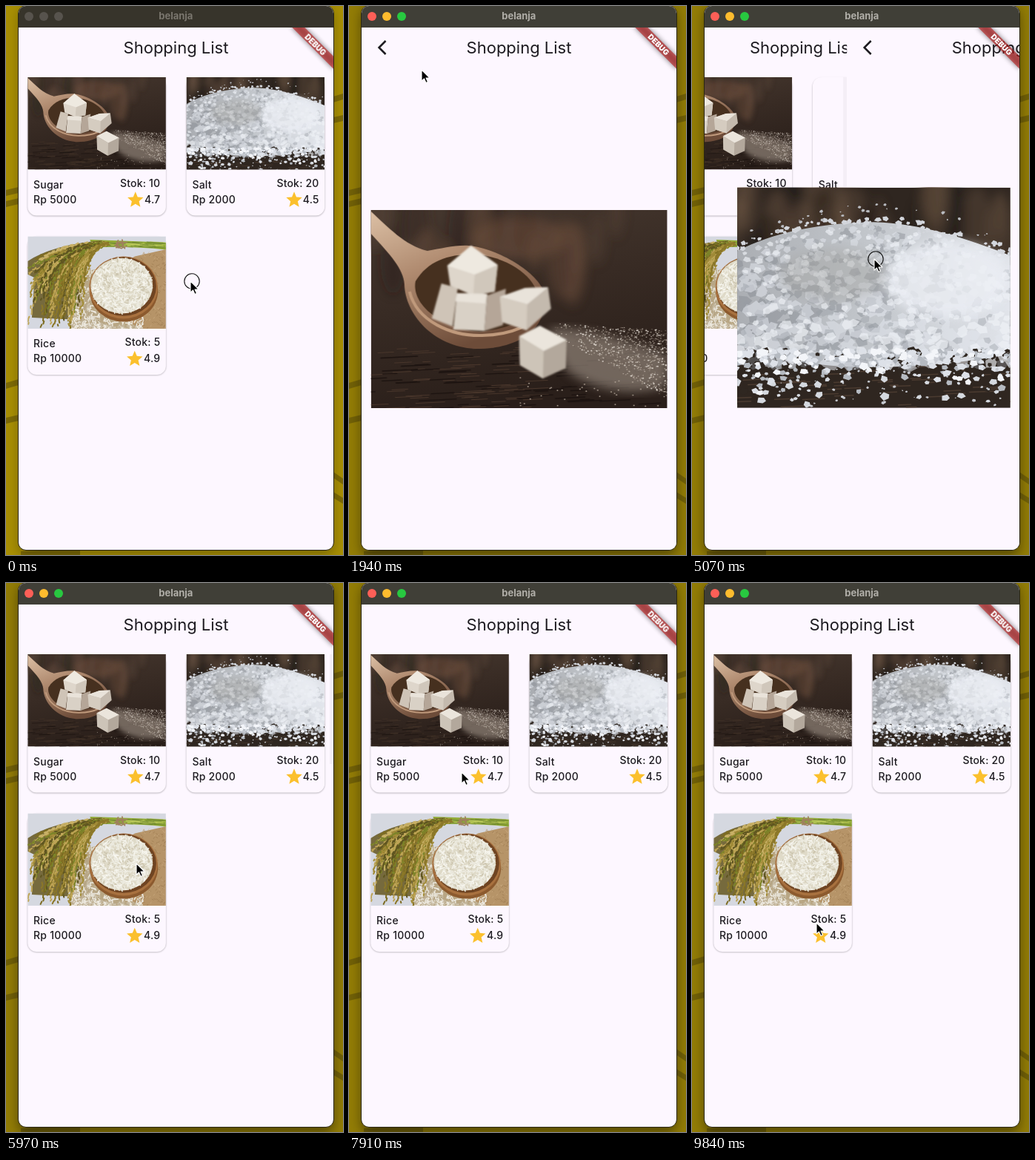
An HTML page for the animation above (9.86 s loop, 455x740 px).

```html
<!DOCTYPE html>
<html lang="en">
<head>
<meta charset="utf-8">
<title>Shopping List</title>
<style>
html, body { margin: 0; width: 100%; height: 100%; overflow: hidden; background: #927c06; }
svg { display: block; }
text { font-family: Inter, "Open Sans", sans-serif; fill: #1d1b20; }
.body { font-size: 14px; letter-spacing: .2px; font-weight: 450; }
.head { font-size: 22px; text-anchor: middle; }
.end { text-anchor: end; }
</style>
</head>
<body>
<svg id="stage" width="455" height="740" viewBox="0 0 455 740"></svg>
<script>
const LOOP = 9860;
const stage = document.getElementById('stage');

// ---------- seeded drawing helpers ----------
let seed = 7;
const rnd = (a = 0, b = 1) => {
  seed = (seed + 0x6D2B79F5) | 0;
  let h = Math.imul(seed ^ (seed >>> 15), 1 | seed);
  h = (h + Math.imul(h ^ (h >>> 7), 61 | h)) ^ h;
  return a + (b - a) * ((h ^ (h >>> 14)) >>> 0) / 4294967296;
};
const r1 = v => Math.round(v * 10) / 10;
const lerp = (a, b, t) => a + (b - a) * t;
const repeat = (n, fn) => Array.from({ length: n }, (_, i) => fn(i)).join('');
const poly = (pts, fill) => `<polygon points="${pts}" fill="${fill}"/>`;
const marks = (n, color, w, fn) =>
  `<path d="${repeat(n, fn)}" stroke="${color}" stroke-width="${w}" stroke-linecap="round" fill="none"/>`;
const grain = (x, y, len, ang) => {
  const dx = Math.cos(ang) * len, dy = Math.sin(ang) * len;
  return `M${r1(x - dx / 2)} ${r1(y - dy / 2)}l${r1(dx)} ${r1(dy)}`;
};
const inEllipse = (cx, cy, rx, ry) => {
  const a = rnd(0, 2 * Math.PI), k = Math.sqrt(rnd());
  return [cx + rx * k * Math.cos(a), cy + ry * k * Math.sin(a)];
};
const crystal = (x, y, size) => {
  const turn = rnd(0, 6);
  return repeat(5, i => {
    const a = turn + i * 1.257, s = size * rnd(.6, 1.1);
    return `${i ? 'L' : 'M'}${r1(x + s * Math.cos(a))} ${r1(y + s * .8 * Math.sin(a))}`;
  }) + 'Z';
};
const crystals = (n, color, fn) => `<path d="${repeat(n, fn)}" fill="${color}"/>`;
const streaks = (n, colors, h) => repeat(n, i =>
  `<ellipse cx="${r1(rnd(0, 400))}" cy="${r1(rnd(0, h))}" rx="${r1(rnd(8, 24))}" ry="${r1(rnd(20, 60))}" fill="${colors[i % colors.length]}" opacity=".4"/>`);

// ---------- pictures ----------
function sugarArt() {
  const pile = () => {
    const k = Math.sqrt(rnd()), x = 245 + 155 * k;
    return `M${r1(x)} ${r1(160 + 48 * k + rnd(-1, 1) * (8 + 38 * k))}h.1`;
  };
  return `<rect width="400" height="267" fill="url(#wood)"/>
    <g filter="url(#soft)">${streaks(18, ['#5a4436', '#2a201b', '#664b3b'], 75)}
    <ellipse cx="200" cy="38" rx="66" ry="28" fill="#694b3b" opacity=".6"/></g>
    ${marks(70, '#4b382d', 1, () => grain(rnd(0, 240), rnd(185, 267), rnd(10, 40), -.05))}
    ${marks(60, '#1d1411', 1.3, () => grain(rnd(0, 400), rnd(190, 267), rnd(10, 50), -.05))}
    <path d="M0 2C22 22 46 48 76 55C96 52 112 47 132 48C172 52 226 84 234 112C240 160 200 188 140 187C84 184 46 140 45 100C44 80 26 60 0 32Z" fill="url(#spoon)"/>
    <path d="M60 96C78 66 110 58 146 60C190 66 222 92 225 116C222 146 188 160 146 164C96 160 54 128 60 96Z" fill="#46301f"/>
    <path d="M52 110C62 150 108 170 150 169C190 168 218 156 229 134" fill="none" stroke="#c09a7c" stroke-width="4"/>
    <path d="M240 160C290 156 350 180 400 194L400 237C350 254 290 240 262 214Z" fill="#92857a" opacity=".7" filter="url(#soft)"/>
    ${marks(420, '#c9beb2', 1.4, pile)}${marks(380, '#6d6056', 1.5, pile)}${marks(110, '#f0eae2', 1.7, pile)}
    ${marks(40, '#b9ac9e', 1.7, () => `M${r1(rnd(200, 400))} ${r1(rnd(225, 266))}h.1`)}
    <g filter="url(#lift)">
    ${poly('157,115 182,106 178,155 153,163', '#b5a698')}
    ${poly('95,99 117,105 110,157 82,146', '#cfc4b7')}
    ${poly('135,48 171,74 167,110 138,115 107,102 103,75', '#ded6cb')}
    ${poly('135,48 171,74 140,87 103,75', '#eee9e0')}
    ${poly('140,87 171,74 167,110 138,115', '#d0c7bb')}
    ${poly('116,112 157,113 153,163 111,161', '#d9d1c6')}
    ${poly('116,112 157,113 154,126 114,123', '#e9e3da')}
    ${poly('174,117 208,105 239,104 243,133 210,162 177,151', '#c4baae')}
    ${poly('174,117 208,105 239,104 211,127', '#e9e3da')}
    ${poly('174,117 211,127 210,162 177,151', '#d5ccc0')}
    ${poly('200,170 228,156 264,175 263,213 232,227 201,209', '#b3a89c')}
    ${poly('200,170 228,156 264,175 233,190', '#ebe5dc')}
    ${poly('200,170 233,190 232,227 201,209', '#cdc4b8')}</g>`;
}

function saltArt() {
  const top = x => 48 + (x - 195) ** 2 * .0012;
  const heap = (s, far = 400) => () => {
    const x = rnd(-5, far), y = lerp(top(x) + 6, 242, rnd());
    return crystal(x, y, s * rnd(.5, 1) * (.5 + y / 200));
  };
  const fringe = s => () => crystal(rnd(-4, 404), 222 + 62 * rnd() * rnd(), rnd(s, s * 2.6));
  const crest = () => { const x = rnd(0, 400); return crystal(x, top(x) + rnd(-9, 9), rnd(2, 6)); };
  return `<rect width="400" height="300" fill="#2f2620"/>
    <g filter="url(#soft)">${streaks(26, ['#65503f', '#1f1815', '#755d4a'], 80)}</g>
    ${marks(80, '#4b3b30', 1.5, () => grain(rnd(0, 400), rnd(215, 300), rnd(8, 36), -.04))}
    <path d="M0 94C50 64 120 48 200 47C270 49 335 72 400 98L400 225C300 243 200 250 120 240C60 234 24 222 0 205Z" fill="url(#heap)"/>
    ${crystals(90, '#d3d6dc', crest)}
    ${crystals(230, 'rgba(128,133,140,.42)', heap(9, 300))}
    ${crystals(420, 'rgba(226,230,237,.55)', heap(9))}
    ${crystals(160, 'rgba(150,155,163,.4)', heap(7))}
    ${crystals(240, 'rgba(240,243,248,.65)', heap(7))}
    <ellipse cx="145" cy="118" rx="75" ry="36" fill="#a5a5a2" opacity=".4" filter="url(#soft)"/>
    <ellipse cx="300" cy="125" rx="85" ry="52" fill="#eceff5" opacity=".75" filter="url(#soft)"/>
    ${crystals(80, '#2f2721', fringe(3))}
    ${crystals(110, '#b5bac1', fringe(3))}
    ${crystals(140, '#dde1e8', fringe(3))}
    ${crystals(60, '#f3f5f9', fringe(3))}
    ${crystals(36, '#d5d9df', () => crystal(rnd(0, 400), rnd(255, 298), rnd(2, 9)))}
    ${crystals(70, '#c3c6cc', () => crystal(rnd(0, 400), rnd(240, 299), rnd(1, 3)))}
    ${crystals(36, '#b9bbc0', () => { const x = rnd(0, 400); return crystal(x, top(x) - rnd(4, 26), rnd(1, 3.5)); })}`;
}

function riceArt() {
  const tones = ['#7d6c22', '#a28c38', '#8b7729', '#bda354', '#7c8428', '#c8b066', '#5f5520'];
  const ears = repeat(66, i => {
    const high = i < 20;
    const ex = high ? rnd(-5, 60) : rnd(0, 158), ey = high ? rnd(58, 170) : rnd(150, 264) - Math.max(0, ex - 130);
    const cx = high ? rnd(90, 140) : ex * .8 + rnd(30, 60), cy = rnd(2, 34);
    const at = (s, a, c, e) => (1 - s) ** 2 * a + 2 * s * (1 - s) * c + s * s * e;
    return marks(44, tones[i % 7], 4.4, j => {
      const s = .08 + .92 * j / 43;
      const ang = Math.atan2((1 - s) * (cy - 22) + s * (ey - cy), (1 - s) * (cx - 240) + s * (ex - cx));
      return grain(at(s, 240, cx, ex) + rnd(-5, 5), at(s, 22, cy, ey) + rnd(-3, 3), rnd(4, 9), ang + rnd(-.45, .45));
    });
  });
  const bowl = () => grain(...inEllipse(273, 143, 87, 78), rnd(7, 11), rnd(0, 3.14));
  const loose = () => grain(rnd(125, 335), 267 - 100 * rnd() * rnd(), rnd(7, 11), rnd(0, 3.14));
  const left = () => grain(rnd(135, 205), rnd(95, 262), rnd(7, 11), rnd(0, 3.14));
  const weave = () => {
    const x = rnd(150, 400);
    return grain(x, rnd(Math.max(45, 230 - x * .55), 267), 5, rnd() < .5 ? .5 : -1);
  };
  return `<rect width="400" height="267" fill="#d5d8e0"/>
    <path d="M400 38L310 58L200 125L120 267H400Z" fill="#b69468"/>
    ${marks(330, '#94734a', 1.1, weave)}${marks(220, '#cfb088', 1.1, weave)}
    <path d="M180 10Q290 14 400 18V39Q300 28 190 32Z" fill="#91aa36"/>
    ${marks(36, '#c3cf62', 1.5, () => grain(rnd(205, 385), rnd(17, 30), rnd(20, 50), .06))}
    ${marks(30, '#66802a', 1.3, () => grain(rnd(205, 385), rnd(17, 33), rnd(20, 50), .06))}
    <path d="M120 165Q150 105 195 95L220 215L330 267H125Z" fill="#b8a684"/>
    ${marks(170, '#e4e0d4', 3.2, left)}${marks(110, '#b5a687', 3, left)}
    ${marks(190, '#ece8de', 3.2, loose)}${marks(80, '#c4b79e', 3, loose)}
    <path d="M215 24Q150 50 145 150L115 240L12 235L20 120L0 110V72Q70 25 215 12Z" fill="#655722" opacity=".85"/>
    ${ears}
    ${marks(14, '#9f805c', 3.5, () => grain(rnd(258, 285), rnd(16, 33), 14, rnd(0, 3)))}
    <ellipse cx="278" cy="158" rx="99" ry="89" fill="#8c5a2e"/>
    <ellipse cx="277" cy="148" rx="99" ry="90" fill="#a8713f"/>
    <ellipse cx="277" cy="145" rx="95" ry="85" fill="#6f4422"/>
    <ellipse cx="272" cy="143" rx="90" ry="80" fill="#dfdac8"/>
    ${marks(190, '#cdc6b0', 3.2, bowl)}${marks(320, '#eceadf', 3.3, bowl)}${marks(140, '#f8f7f0', 2.6, bowl)}`;
}

// ---------- scene ----------
const goods = [
  { id: 'sugar', name: 'Sugar', price: 'Rp 5000', stock: 'Stok: 10', rate: '4.7', x: 29.3, y: 96, h: 267, art: sugarArt },
  { id: 'salt', name: 'Salt', price: 'Rp 2000', stock: 'Stok: 20', rate: '4.5', x: 243.6, y: 96, h: 300, art: saltArt },
  { id: 'rice', name: 'Rice', price: 'Rp 10000', stock: 'Stok: 5', rate: '4.9', x: 29.3, y: 310.4, h: 267, art: riceArt }
];
const STAR = 'M12 17.27L18.18 21l-1.64-7.03L22 9.24l-7.19-.61L12 2 9.19 8.63 2 9.24l5.46 4.73L5.82 21z';
const card = g => `<g transform="translate(${g.x} ${g.y})">
  <rect y="1.2" width="186.6" height="186" rx="12" fill="#000" opacity=".3" filter="url(#lift)"/>
  <rect width="186.6" height="186.6" rx="12" fill="#fdf7ff"/>
  <use id="pic-${g.id}" href="#${g.id}" width="186.6" height="124.5"/>
  <text class="body" x="7.8" y="149.5">${g.name}</text>
  <text class="body" x="7.8" y="169.8">${g.price}</text>
  <text class="body end" x="179" y="147.7">${g.stock}</text>
  <text class="body end" x="179" y="169.8">${g.rate}</text>
  <path d="${STAR}" fill="#fbc02d" transform="translate(${g.id === 'rice' ? 131.6 : 132.6} 152.2) scale(1.07)"/>
</g>`;
const dash = (x, y, w, slope) =>
  `<path d="M${x} ${y}l${w} ${slope}v8l${-w} ${-slope}Z"/>`;

stage.innerHTML = `<defs>
  <linearGradient id="wood" x1="0" y1="0" x2=".3" y2="1"><stop offset="0" stop-color="#473930"/><stop offset=".5" stop-color="#382b24"/><stop offset="1" stop-color="#2a1f1a"/></linearGradient>
  <linearGradient id="spoon" x1="0" y1="0" x2=".5" y2="1"><stop offset="0" stop-color="#dcc0a5"/><stop offset=".45" stop-color="#b08b70"/><stop offset="1" stop-color="#6d4c39"/></linearGradient>
  <linearGradient id="heap"><stop offset="0" stop-color="#a9acb1"/><stop offset=".5" stop-color="#c3c7cc"/><stop offset="1" stop-color="#e3e6ec"/></linearGradient>
  <filter id="soft"><feGaussianBlur stdDeviation="7"/></filter>
  <filter id="lift" x="-5%" y="-5%" width="110%" height="110%"><feGaussianBlur stdDeviation="1"/></filter>
  <filter id="shade" x="-20%" y="-100%" width="140%" height="300%"><feGaussianBlur stdDeviation="3.9"/></filter>
  <filter id="halo"><feGaussianBlur stdDeviation="8"/></filter>
  <clipPath id="pane"><path d="M17 28H442V723a10 10 0 0 1-10 10H27a10 10 0 0 1-10-10Z"/></clipPath>
  ${goods.map(g => `<symbol id="${g.id}" viewBox="0 0 400 ${g.h}" preserveAspectRatio="xMidYMid slice">${g.art()}</symbol>`).join('')}
</defs>
<rect id="desk" width="455" height="740"/>
<g fill="#4a3f0a" opacity=".45">
  ${dash(0, 248, 17, -4)}${dash(0, 263, 17, -4)}${dash(0, 508, 17, -5)}${dash(0, 555, 17, -4)}
  ${dash(442, 122, 13, -4)}${dash(442, 150, 13, -3)}${dash(442, 628, 13, 9)}${dash(442, 655, 13, 8)}${dash(20, 735, 80, -3)}
</g>
<rect id="glow" x="17" y="4" width="425" height="736" rx="10" filter="url(#halo)"/>
<rect x="16.5" y="-.5" width="426" height="734" rx="10.5" fill="#fdf7ff" stroke="#2b2711"/>
<g clip-path="url(#pane)">
  <g id="list">
    <text class="head" x="229.5" y="64">Shopping List</text>
    ${goods.map(card).join('')}
    <rect id="splash" x="243.6" y="220.5" width="56.5" height="30" fill="#000" opacity=".03"/>
  </g>
  <g id="detail">
    <rect x="12" y="96" width="5" height="148" fill="#000" opacity=".035"/>
    <rect x="17" y="28" width="425" height="705" fill="#fdf7ff"/>
    <text class="head" x="229.5" y="64">Shopping List</text>
    <path d="M49.5 47L40.5 56L49.5 65" fill="none" stroke="#1d1b20" stroke-width="2.5"/>
  </g>
  <use id="hero"/>
  <g transform="translate(442 28) rotate(45)">
    <rect x="-40" y="28" width="80" height="12" opacity=".5" filter="url(#shade)"/>
    <rect x="-40" y="28" width="80" height="12" fill="#b71c1c" opacity=".627"/>
    <text y="37.7" font-size="10.2" font-weight="900" text-anchor="middle" style="fill:#fff">DEBUG</text>
  </g>
</g>
<path id="bar" d="M17 29V10A10 10 0 0 1 27 0H432a10 10 0 0 1 10 10V29Z"/>
${[31, 51, 71].map(x => `<circle class="lamp" cx="${x}" cy="14" r="6"/>`).join('')}
<text id="app" x="229.3" y="18.3" font-size="13" font-weight="700" text-anchor="middle">belanja</text>
<g id="cursor">
  <circle id="ring" cx="2" cy="0" r="10.2" fill="none" stroke="#111" stroke-width="1.1"/>
  <path d="M0 0V15.2L3.5 11.9L6 17.4L8.4 16.3L6 11H11Z" stroke="#fff" stroke-width="1.1" stroke-linejoin="round"/>
</g>`;

const $ = id => document.getElementById(id);
const set = (el, attrs) => { for (const k in attrs) el.setAttribute(k, attrs[k]); };
const show = (el, on) => { el.style.display = on ? '' : 'none'; };

// ---------- easing ----------
const bezier = (x1, y1, x2, y2) => x => {
  const at = (s, a, b) => 3 * a * s * (1 - s) ** 2 + 3 * b * s * s * (1 - s) + s ** 3;
  let lo = 0, hi = 1;
  for (let i = 0; i < 24; i++) {
    const mid = (lo + hi) / 2;
    if (at(mid, x1, x2) < x) lo = mid; else hi = mid;
  }
  return at(lo, y1, y2);
};
const heroEase = bezier(.4, 0, .2, 1);
const slideStart = bezier(.283, .044, .545, .57);
const slideEnd = bezier(.209, 1, .435, .976);
const slide = p => p < .198 ? .541 * slideStart(p / .198) : .541 + .459 * slideEnd((p - .198) / .802);
const underIn = bezier(.35, .91, .33, .97);
const underOut = bezier(.67, .03, .65, .09);

// ---------- arc motion of the shared picture ----------
function arc([ax, ay], [bx, by], t) {
  const dx = Math.abs(bx - ax), dy = Math.abs(by - ay);
  if (dx < 2 || dy < 2) return [lerp(ax, bx, t), lerp(ay, by, t)];
  const r = (dx * dx + dy * dy) / (2 * Math.min(dx, dy));
  const [cx, cy] = dx < dy ? [bx + r * Math.sign(ax - bx), by] : [ax, ay + r * Math.sign(by - ay)];
  const from = Math.atan2(ay - cy, ax - cx);
  let turn = Math.atan2(by - cy, bx - cx) - from;
  turn = Math.atan2(Math.sin(turn), Math.cos(turn));
  return [cx + r * Math.cos(from + turn * t), cy + r * Math.sin(from + turn * t)];
}
function arcRect(a, b, t) {
  const right = a[0] + a[2] < b[0] + b[2], down = a[1] + a[3] < b[1] + b[3];
  const corner = (r, e, s) => [e ? r[2] : r[0], s ? r[3] : r[1]];
  const p = arc(corner(a, !right, !down), corner(b, !right, !down), t);
  const q = arc(corner(a, right, down), corner(b, right, down), t);
  const x = Math.min(p[0], q[0]), y = Math.min(p[1], q[1]);
  return { x, y, width: Math.abs(p[0] - q[0]), height: Math.abs(p[1] - q[1]) };
}

// ---------- timeline ----------
// runs of screen updates: first, last, count
const runs = [[150, 740, 5], [1190, 2090, 7], [2240, 3280, 8], [3430, 3430, 1], [3730, 4470, 6],
  [5070, 5970, 7], [6120, 6560, 4], [7310, 8210, 7], [8360, 9090, 6], [9390, 9840, 4]];
const ticks = [0];
for (const [a, b, n] of runs)
  for (let i = 0; i < n; i++) ticks.push(n > 1 ? Math.floor(a + (b - a) * i / (n - 1)) : a);

// start, item, opening
const moves = [[1220, 0, true], [2150, 0, false], [3745, 1, true], [4987, 1, false],
  [5970, 2, true], [7170, 2, false], [8270, 0, true], [9245, 0, false]];
const clicks = [0, 1190, 2240, 3730, 5070, 6120, 7310, 8360, 9390];
const path = [[0, 249, 371], [740, 117, 158], [1640, 117, 158], [1940, 98, 86], [2090, 47, 55], [2690, 47, 55],
  [3280, 318, 168], [3430, 321, 170], [4030, 321, 170], [4470, 246, 341], [5370, 246, 341], [5970, 176, 378],
  [7610, 176, 378], [7910, 152, 255], [8210, 130, 180], [8660, 130, 180], [9090, 168, 458], [LOOP, 168, 458]];
const lamps = ['#fe5f57', '#febc2e', '#28c840'];

function draw(t) {
  const active = t >= 1190;
  set($('desk'), { fill: active ? '#927c06' : '#a88f04' });
  set($('glow'), { opacity: active ? .45 : .28 });
  set($('bar'), { fill: active ? '#403f37' : '#37342b' });
  $('app').style.fill = active ? '#b0aea8' : '#7a766e';
  document.querySelectorAll('.lamp').forEach((l, i) => set(l, { fill: active ? lamps[i] : '#57534d' }));

  const move = moves.filter(m => m[0] <= t).pop();
  const p = move ? Math.min(1, (t - move[0]) / 500) : 1;
  const open = !!move && move[2];
  const flying = open || p < 1;
  const under = p === 1 ? +open : open ? underIn(p) : underOut(1 - p);
  set($('list'), { transform: `translate(${-425 / 3 * under} 0)` });
  set($('detail'), { transform: `translate(${425 * (open ? 1 - slide(p) : slide(p))} 0)` });
  show($('detail'), flying);
  show($('hero'), flying);
  goods.forEach((g, i) => show($('pic-' + g.id), !(flying && i === move[1])));
  if (flying) {
    const g = goods[move[1]];
    const small = [g.x, g.y, g.x + 186.6, g.y + 124.5];
    const big = [29.7, 408.5 - g.h / 2, 429.7, 408.5 + g.h / 2];
    const k = heroEase(p);
    set($('hero'), { href: '#' + g.id, ...(open ? arcRect(small, big, k) : arcRect(big, small, k)) });
  }
  show($('splash'), t === 3730);

  const i = path.findIndex(k => k[0] > t), a = path[i - 1], b = path[i];
  const s = (t - a[0]) / (b[0] - a[0]);
  set($('cursor'), { transform: `translate(${lerp(a[1], b[1], s)} ${lerp(a[2], b[2], s)})` });
  show($('ring'), clicks.includes(t));
}

const begin = performance.now();
let last = -1;
function loop() {
  const now = (performance.now() - begin) % LOOP;
  const t = ticks.filter(v => v <= now).pop();
  if (t !== last) draw(last = t);
  requestAnimationFrame(loop);
}
loop();
</script>
</body>
</html>
```
